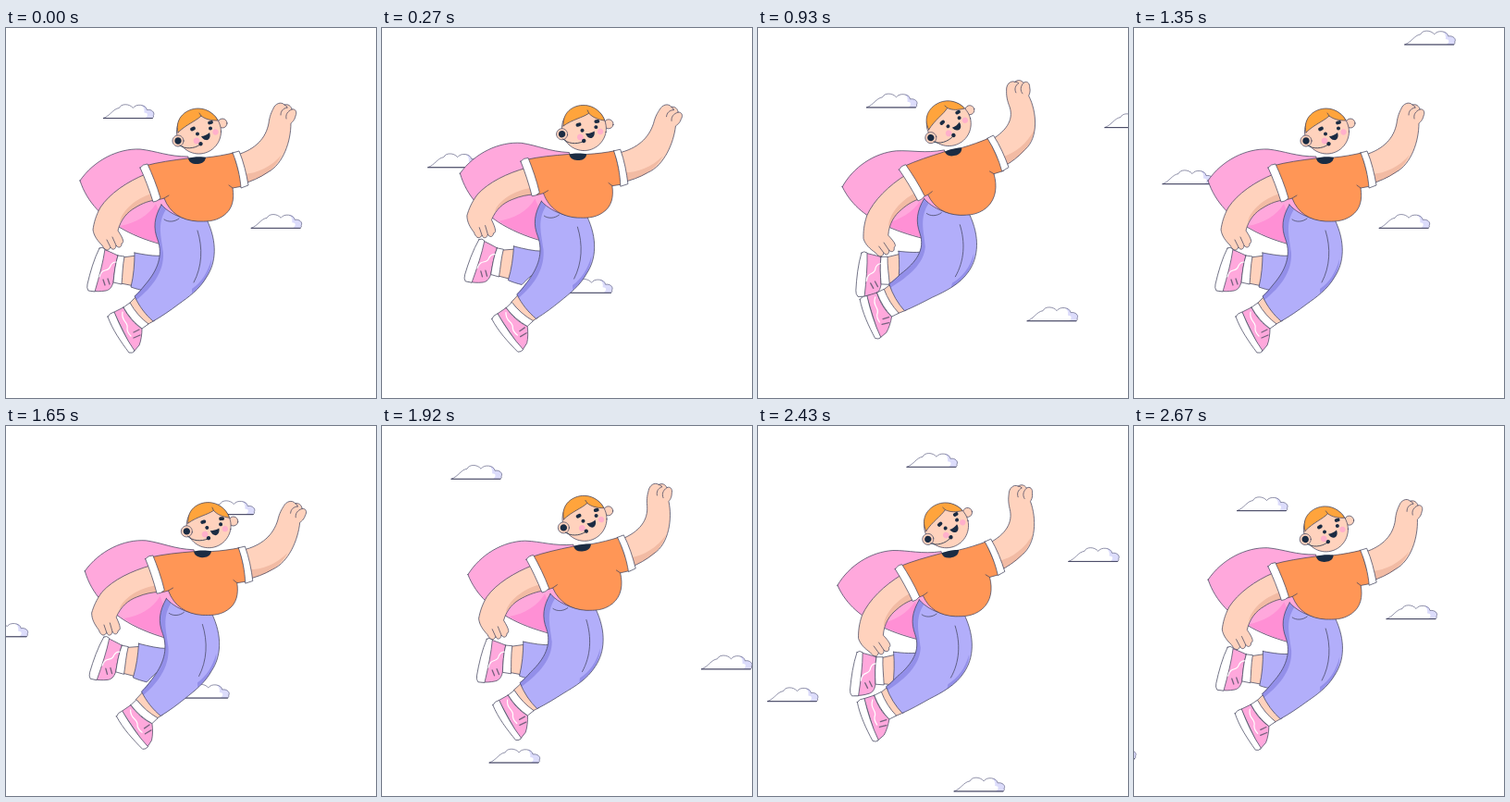
An HTML page for the animation above (2.7 s loop, 400 px wide and 400 px high).

```html
<!DOCTYPE html>
<html lang="en">
<head>
<meta charset="utf-8">
<title>Flying hero</title>
<style>
html, body { margin: 0; width: 100%; height: 100%; overflow: hidden; background: #fff; }
svg { display: block; width: 100vw; height: 100vh; }
path { stroke-linejoin: round; stroke-linecap: round; }
</style>
</head>
<body>
<svg id="stage" viewBox="0 0 400 400"></svg>
<script>
const LOOP = 2700, CYCLE = 1350, STEP = 30;
const stage = document.getElementById('stage');

const INK = '#45465f', NAVY = '#1b2c43', WHITE = '#fff', LACE = '#77627f';
const SKIN = '#ffd2bd', SKIN_DARK = '#f2bba4';
const ORANGE = '#ff9656', HAIR = '#ffa43c';
const LILAC = '#b2aefa', LILAC_DARK = '#938fe9';
const PINK = '#ffa8dc', PINK_DARK = '#ff90d5';

const mod = (a, n) => ((a % n) + n) % n;

function add(parent, tag, attrs) {
  const el = document.createElementNS('http://www.w3.org/2000/svg', tag);
  for (const key in attrs) el.setAttribute(key, attrs[key]);
  return parent.appendChild(el);
}

// Clouds drift down-left; a lane is the value of x + y where they enter.
const SLOW = { x: 0.206, y: 0.197 }, FAST = { x: 0.2615, y: 0.259 };
const clouds = [];

function addClouds(lane, speed, ...starts) {
  const y = Math.max(-15, lane - 420), x = lane - y;
  const shape = 'M0,0 C8,-3 10,-10 17,-11 C19,-16 28,-16 32,-11 C35,-16 46,-15 47,-9 C52,-10 56,-6 54,-3 Q55,-1 53,0Z';
  for (const start of starts) {
    const el = add(stage, 'g', {});
    add(el, 'path', { d: shape, fill: WHITE });
    add(el, 'path', { d: 'M41,-14 Q46,-14 47,-9 C52,-10 56,-6 54,-3 L53,0 L45,0 C49,-3 48,-6 44,-6 Q45,-11 41,-14Z', fill: '#dcdcfb' });
    add(el, 'path', { d: shape, fill: 'none', stroke: '#55577c', 'stroke-width': 0.65 });
    add(el, 'path', { d: 'M0,0 L53,0', stroke: '#30314f', 'stroke-width': 0.8 });
    clouds.push({ el, start, x, y, speed });
  }
}
addClouds(208, SLOW, 418, 2129);
addClouds(483, FAST, 758, 758 + CYCLE);
addClouds(609, FAST, 437, 1635);
addClouds(311, FAST, 1223);
addClouds(133, FAST, 1641);

// Every movement is one wave per cycle that is zero in the rest pose.
const wave = ([side, lift], w) => side * Math.sin(w) + lift * (1 - Math.cos(w));
const STILL = [0, 0];

// A bone turns about its pivot (swing in degrees) and pulls points near its heart.
const bones = {};
function bone(name, parent, pivot, heart, swing, driftX = STILL, driftY = STILL) {
  bones[name] = { parent: bones[parent], pivot, heart, swing, driftX, driftY };
}
bone('chest', null, [206, 142], [204, 155], [5.6, -3.8], [2, 4.9], [0.3, -6.2]);
bone('pelvis', null, [205, 240], [205, 240], STILL, [-0.9, 7.6], [-0.5, -4.9]);
bone('head', 'chest', [208, 140], [208, 112], [5.9, 1.5]);
bone('armL', 'chest', [156, 167], [110, 222], [3.4, 2.6]);
bone('armR', 'chest', [252, 154], [270, 148], [2, -1]);
bone('foreR', 'armR', [292, 138], [303, 92], [6, -4.7]);
bone('leg', 'pelvis', [195, 215], [150, 297], [-3.7, 2.5]);
bone('foot2', 'leg', [148, 303], [125, 328], [-5.1, -1.7]);
bone('shin', 'pelvis', [195, 225], [145, 263], [4, -0.8]);
bone('foot1', 'shin', [137, 263], [100, 262], [2, -2.4]);

function pose(w) {
  for (const b of Object.values(bones)) {
    const base = b.parent ? place(b.parent, ...b.pivot) : b.pivot;
    b.x = base[0] + wave(b.driftX, w);
    b.y = base[1] + wave(b.driftY, w);
    b.angle = (b.parent ? b.parent.angle : 0) + wave(b.swing, w) * Math.PI / 180;
    b.cos = Math.cos(b.angle);
    b.sin = Math.sin(b.angle);
  }
}

function place(b, x, y) {
  const dx = x - b.pivot[0], dy = y - b.pivot[1];
  return [b.x + b.cos * dx - b.sin * dy, b.y + b.sin * dx + b.cos * dy];
}

// Blend the bones of a shape by nearness.
function bend(x, y, rig) {
  let sum = 0, sx = 0, sy = 0;
  for (const b of rig) {
    const w = 1 / (Math.hypot(x - b.heart[0], y - b.heart[1]) + 1) ** 4;
    const [px, py] = place(b, x, y);
    sum += w; sx += w * px; sy += w * py;
  }
  return (sx / sum).toFixed(2) + ',' + (sy / sum).toFixed(2);
}

const shapes = [];
function draw(rig, fill, d, stroke = 'none', width = 0.75) {
  const el = add(stage, 'path', { fill, stroke, 'stroke-width': width });
  shapes.push({ el, d, rig: rig.split(' ').map(name => bones[name]) });
}
const solid = (rig, fill, d) => draw(rig, fill, d, INK);
const line = (rig, d, color = INK, width = 0.75) => draw(rig, 'none', d, color, width);

function dot(x, y, r) {
  const arc = i => {
    const at = (turn, k) => {
      const a = turn * Math.PI / 2, c = Math.cos(a), s = Math.sin(a);
      return `${(x + r * (c - k * s)).toFixed(2)},${(y + r * (s + k * c)).toFixed(2)}`;
    };
    return `C${at(i, 0.5523)} ${at(i + 1, -0.5523)} ${at(i + 1, 0)}`;
  };
  return `M${x + r},${y} ` + [0, 1, 2, 3].map(arc).join(' ') + 'Z';
}

// Cape
solid('chest pelvis', PINK, 'M80,165 C95,143 121,130 145,131 C163,133 175,139 197,139 L200,200 L168,234 C150,229 135,223 122,215 C106,205 88,190 80,165Z');
draw('chest pelvis', PINK_DARK, 'M123,214 C140,211 154,203 162,190 L172,215 L168,233 C150,228 135,222 123,214Z');

// Back leg
solid('shin foot1', SKIN, 'M126,248 L141,246 L139,279 L124,276Z');
solid('foot1', PINK, 'M103,238 C110,241 115,243 121,246 C118,256 117,266 116,275 C114,281 112,283 108,284 C102,285 97,285 92,284Z');
solid('foot1', WHITE, 'M101,238 Q104,236 107,239 C105,253 101,268 96,285 L89,284 Q87,281 88,277 C91,264 95,250 101,238Z');
solid('foot1', WHITE, 'M121,246 L128,247 C126,257 126,267 125,277 L116,275 C117,265 118,255 121,246Z');
line('foot1', 'M101,269 C104,258 111,265 113,257 Q115,253 119,253', WHITE, 1.2);
line('foot1', 'M105,272 L107,278 M110,271 L112,277', LACE, 1.3);
solid('shin pelvis', LILAC, 'M139,243 C150,245 160,247 170,246 L172,262 C163,270 155,278 150,284 C145,283 140,282 135,280 C138,268 139,255 139,243Z');

// Front leg
solid('leg foot2', SKIN, 'M133,298 L141,290 L161,316 L152,321Z');
solid('foot2', PINK, 'M117,307 L127,302 C132,312 139,320 147,325 C147,331 146,338 144,343 L138,350 Z');
solid('foot2', WHITE, 'M110,312 Q112,308 117,307 C123,322 130,336 139,349 Q137,352 133,351 C124,339 115,326 110,312Z');
solid('foot2', WHITE, 'M127,302 L134,297 C139,306 146,314 154,320 L147,325 C139,319 132,311 127,302Z');
line('foot2', 'M126,307 C124,318 133,317 131,325 Q131,329 135,333', WHITE, 1.2);
line('foot2', 'M138,329 L144,326 M138,335 L145,332', LACE, 1.3);
const pants = 'M168,191 C160,205 159,216 164,229 C170,246 164,262 150,278 C146,283 143,287 139,290 C144,301 151,310 159,317 C168,312 178,305 186,299 C197,291 209,283 217,269 C227,254 229,232 217,207 C205,211 180,205 168,191Z';
draw('pelvis leg', LILAC, pants);
draw('pelvis leg', LILAC_DARK, 'M168,191 C160,205 159,216 164,229 C170,246 164,262 150,278 L139,290 L141,294 C160,279 171,262 170,243 C168,226 163,212 173,196Z');
draw('pelvis leg', LILAC_DARK, 'M201,282 C211,275 218,265 222,250 C222,264 214,276 201,287Z');
line('pelvis leg', pants);
line('pelvis leg', 'M207,219 C213,238 212,258 203,275 M171,207 C175,210 182,210 187,206');

// Right arm
const armR = 'M250,137 C270,131 281,119 284,103 C285,95 287,91 289,87 C291,82 297,79 301,83 C305,82 308,84 309,88 C313,87 315,91 313,95 C312,100 309,102 308,103 C308,122 300,147 283,156 C274,162 265,166 257,168Z';
const rigR = 'chest armR foreR';
draw(rigR, SKIN, armR);
draw(rigR, SKIN_DARK, 'M258,168 L257,158 C272,157 287,150 298,137 C292,150 283,157 275,161Z');
line(rigR, armR);
line(rigR, 'M297,94 C297,90 299,87 304,86 M303,98 C302,94 304,90 309,88 M301,83 Q304,84 304,86');

// Shirt
solid('chest pelvis', ORANGE, 'M150,149 C165,145 180,143 196,141 L216,140 C227,139 237,137 246,135 L256,171 L245,173 C247,185 245,196 235,203 C225,210 215,209 207,209 C190,208 177,200 171,184 L164,186Z');
line('chest pelvis', 'M171,184 L176,181 M245,173 L241,170');
draw('chest', NAVY, 'M197,141 C202,139 212,139 216,140 C215,146 210,147 206,147 C201,147 198,145 197,141Z');

// Left arm
const armL = 'M151,158 C131,166 112,179 102,194 C97,203 95,211 94,218 C95,225 99,230 104,235 C106,239 110,243 113,237 C115,241 119,239 119,235 C121,238 125,238 125,233 C128,232 127,228 121,219 C124,207 131,199 140,194 C148,189 155,187 161,186Z';
draw('chest armL', SKIN, armL);
draw('chest armL', SKIN_DARK, 'M161,186 C146,189 133,196 123,210 C125,198 140,184 158,179Z');
line('chest armL', armL);
line('chest armL', 'M113,237 L109,229 M119,235 L115,226');

// Cuffs
solid('chest', WHITE, 'M145,151 Q148,147 153,147 C158,158 163,170 167,184 Q163,188 159,188 C155,175 150,162 145,151Z');
solid('chest', WHITE, 'M245,135 L252,133 C257,145 260,158 262,170 L254,173 C253,160 250,147 245,135Z');

// Head
solid('head', SKIN, dot(234, 103, 5));
solid('head', SKIN, dot(208.5, 112, 24));
solid('head', HAIR, 'M186,113 C182,97 195,87 208,87 C219,87 227,95 229,100 C222,100 216,99 211,95 C205,101 195,104 186,113Z');
line('head', 'M211,95 L209,92');
solid('head', SKIN, dot(186, 122, 6));
draw('head', NAVY, dot(186, 122, 3.7));
draw('head', '#ffb0cb', dot(206, 122, 3.4) + dot(226.5, 112.5, 3.2));
line('head', 'M201,109.5 L203,108.5 M220,102.5 L222,102', NAVY, 3.8);
draw('head', NAVY, dot(207, 114.5, 2) + dot(221, 108.5, 2));
draw('head', NAVY, 'M211,117 C214,117 218,115 220,113 C222,118 219,122 216,121 C214,121 212,119 211,117Z');
line('head', 'M188,127 C193,131 203,131 210,126', NAVY, 0.8);
draw('head', NAVY, dot(210.5, 125.3, 2.2));

function render(ms) {
  const t = Math.floor(mod(ms, LOOP) / STEP) * STEP;
  for (const { el, start, x, y, speed } of clouds) {
    const age = mod(t - start, LOOP);
    el.setAttribute('transform', `translate(${x - speed.x * age} ${y + speed.y * age})`);
  }
  pose(t / CYCLE * 2 * Math.PI);
  for (const { el, rig, d } of shapes) {
    el.setAttribute('d', d.replace(/(-?[\d.]+),(-?[\d.]+)/g, (_, x, y) => bend(+x, +y, rig)));
  }
}

const begin = performance.now();
function tick() {
  render(performance.now() - begin);
  requestAnimationFrame(tick);
}
tick();
</script>
</body>
</html>
```
